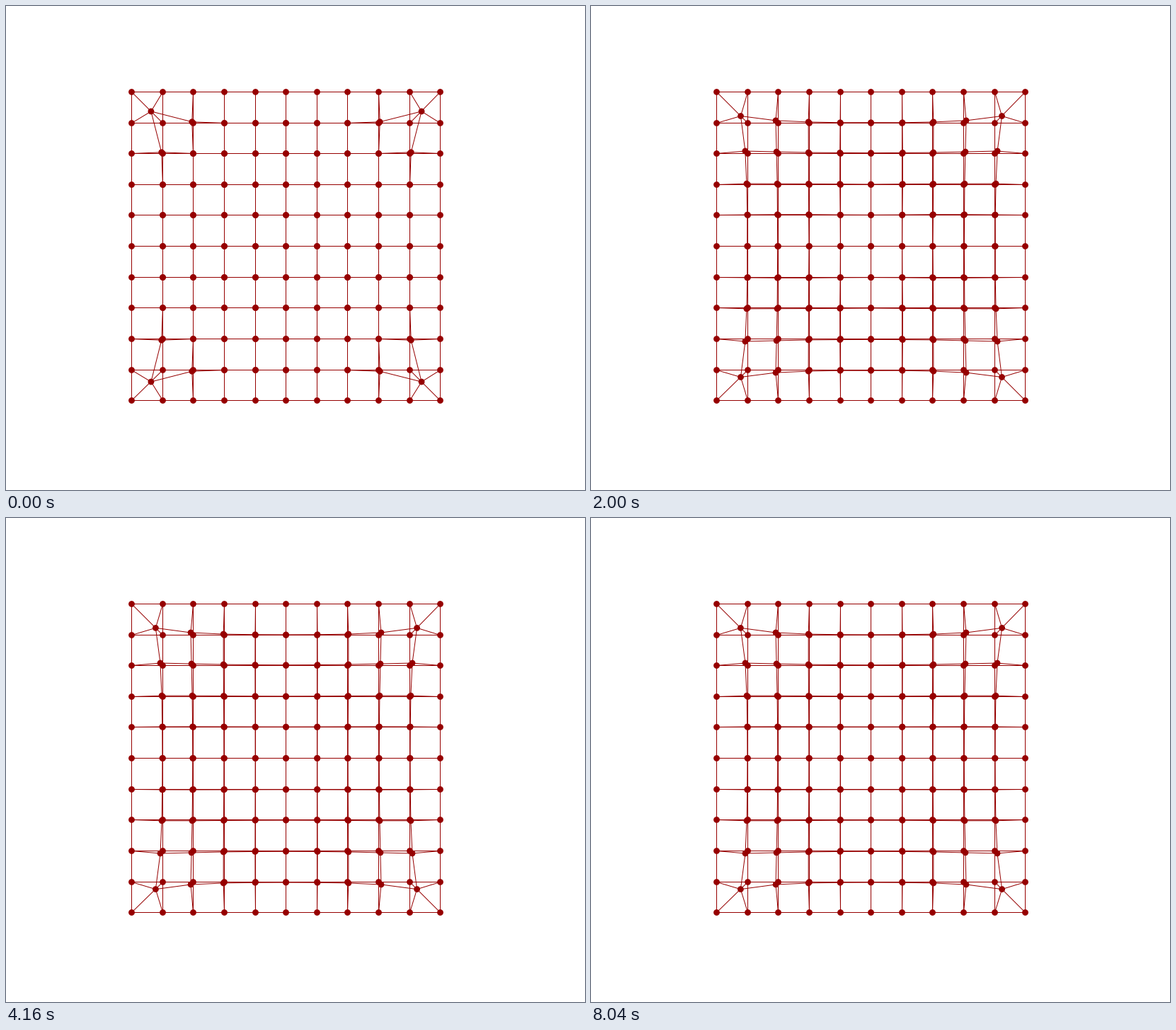
Write a matplotlib script that moves like this. It is 818 by 684 pixels and loops after 8080 ms.

```python
import numpy as np
import matplotlib.pyplot as plt
from matplotlib.animation import FuncAnimation
from matplotlib.collections import LineCollection

W, H, DPI = 818, 684, 64
FRAMES, INTERVAL = 202, 40
N, STEP = 11, 43.64
ORIGIN = (177.5, 121.4)
STIFFNESS, DAMPING, WARMUP = 0.2, 0.9, 2
RED = "#960000"


def px(size):
    return size * 72 / DPI


def node(col, row):
    return row * N + col


# Square mesh with one brace across each corner cell
mesh = [(node(c, r), node(c + 1, r)) for r in range(N) for c in range(N - 1)]
mesh += [(node(c, r), node(c, r + 1)) for r in range(N - 1) for c in range(N)]
braces = [(node(a, b), node(c, d))
          for a, c in ((0, 1), (N - 1, N - 2))
          for b, d in ((0, 1), (N - 1, N - 2))]
mesh = np.array(mesh)
springs = np.vstack([mesh, braces])

rows, cols = np.divmod(np.arange(N * N), N)
rest = np.column_stack([cols, rows]).astype(float)
inner = (rows > 0) & (rows < N - 1) & (cols > 0) & (cols < N - 1)
loose = mesh[inner[mesh].any(axis=1)]

# Sum of (neighbour - node) over all springs
pull = np.zeros((N * N, N * N))
pull[springs[:, 0], springs[:, 1]] = 1
pull += pull.T
pull -= np.diag(pull.sum(axis=1))

# The resting grid sits on pixel centres
base = np.floor(rest * STEP + ORIGIN) + 0.5


def simulate():
    """Zero-length springs tug the inner nodes while the border stays fixed."""
    pos, vel = rest.copy(), np.zeros_like(rest)
    states = []
    for _ in range(WARMUP + FRAMES):
        states.append(base + (pos - rest) * STEP)
        vel = (DAMPING * vel + STIFFNESS * (pull @ pos)) * inner[:, None]
        pos = pos + vel
    return states[WARMUP:]


states = simulate()

fig = plt.figure(figsize=(W / DPI, H / DPI), dpi=DPI, facecolor="white")
ax = fig.add_axes([0, 0, 1, 1])
ax.set_xlim(0, W)
ax.set_ylim(H, 0)
ax.axis("off")


def add_mesh(points, links, centres):
    lines = LineCollection(points[links], colors=RED, linewidths=px(1),
                           snap=False, zorder=1)
    ax.add_collection(lines)
    # One size per dot keeps sub-pixel placement
    dots = ax.scatter(*centres.T, s=np.full(len(centres), px(8.8) ** 2),
                      c=RED, linewidths=0, snap=False, zorder=2)
    return lines, dots


add_mesh(base, springs, base)
lines, dots = add_mesh(states[0], loose, states[0][inner])


def update(i):
    lines.set_segments(states[i][loose])
    dots.set_offsets(states[i][inner])
    return lines, dots


anim = FuncAnimation(fig, update, frames=FRAMES, interval=INTERVAL,
                     repeat=True, repeat_delay=0, blit=False)
plt.show()
```
